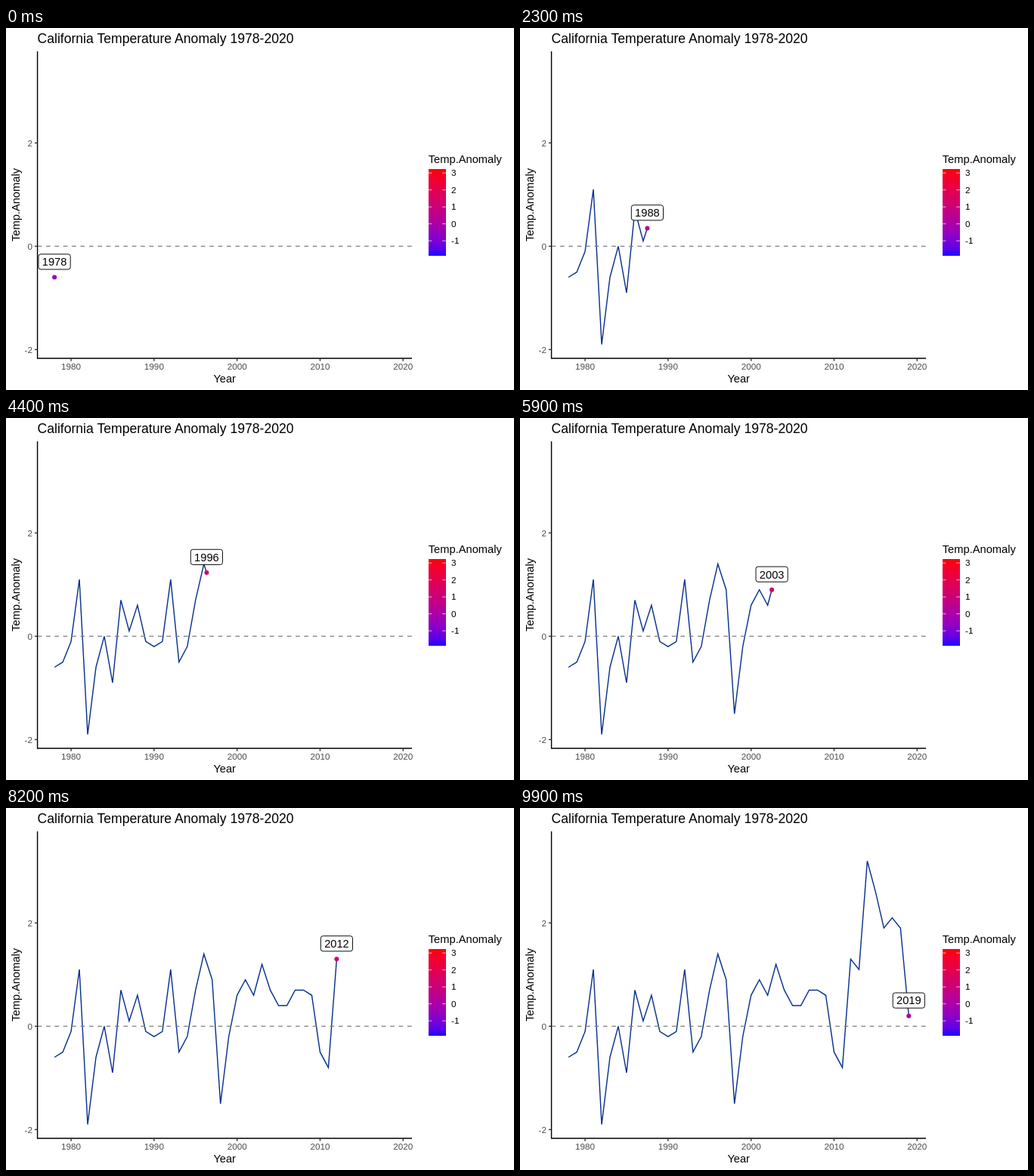
An HTML page that plays this animation: 672x480 px, repeating every 10000 ms.

```html
<!DOCTYPE html>
<html lang="en">
<head>
<meta charset="utf-8">
<title>Temperature anomaly</title>
<style>
html, body { margin: 0; width: 100%; height: 100%; overflow: hidden; background: #fff; }
svg { position: absolute; left: 0; top: 0; font: 14.67px "Liberation Sans", Arial, sans-serif; }
.bar { position: absolute; left: 558.8px; top: 187.3px; width: 23.04px; height: 115.2px;
  background: linear-gradient(in lab, red, blue); }
.small { font-size: 11.73px; }
.axis { fill: #4d4d4d; }
.mid { text-anchor: middle; }
.end { text-anchor: end; }
</style>
</head>
<body>
<div class="bar"></div>
<svg id="chart" width="672" height="480" viewBox="0 0 672 480">
  <text x="41.5" y="20" font-size="17.6">California Temperature Anomaly 1978-2020</text>
  <text x="289.2" y="470" class="mid">Year</text>
  <text transform="translate(18 234.5) rotate(-90)" class="mid">Temp.Anomaly</text>
  <text x="558.8" y="179">Temp.Anomaly</text>
  <path id="line" fill="none" stroke="#08308e" stroke-width="1.42"/>
  <path d="M41.6 289.4H537" stroke="#7f7f7f" stroke-width="1.42" stroke-dasharray="5.69"/>
  <circle id="dot" r="3"/>
  <g id="label">
    <rect x="-21.1" y="-10.1" width="42.2" height="20.2" rx="3" fill="#fff" stroke="#000" stroke-width=".95"/>
    <text y="5.3" class="mid"></text>
  </g>
  <path d="M41.6 31V438H537" fill="none" stroke="#000" stroke-width="1.42"/>
</svg>
<script>
const START = 1978, FRAMES = 100, FRAME_MS = 100;
const values = [
  -.6, -.5, -.1, 1.1, -1.9, -.6, 0, -.9, .7, .1, .6, -.1, -.2, -.1, 1.1, -.5, -.2, .7, 1.4, .9, -1.5,
  -.2, .6, .9, .6, 1.2, .7, .4, .4, .7, .7, .6, -.5, -.8, 1.3, 1.1, 3.2, 2.6, 1.9, 2.1, 1.9, .2
];
const last = values.length - 1;
const $ = id => document.getElementById(id);
const px = year => 86.07 + (year - 1980) * 10.98;
const py = value => 289.4 - value * 68.5;

function add(tag, attrs, text = "") {
  const el = document.createElementNS("http://www.w3.org/2000/svg", tag);
  for (const key in attrs) el.setAttribute(key, attrs[key]);
  el.textContent = text;
  $("chart").append(el);
}
const tick = (d, stroke, width) => add("path", { d, stroke, "stroke-width": width });

for (let year = 1980; year <= 2020; year += 10) {
  tick(`M${px(year)} 438v3.67`, "#333", 1.42);
  add("text", { x: px(year), y: 453, class: "small axis mid" }, year);
}
for (const v of [-2, 0, 2]) {
  tick(`M41.6 ${py(v)}h-3.67`, "#333", 1.42);
  add("text", { x: 35, y: py(v) + 4.2, class: "small axis end" }, v);
}
for (let v = -1; v <= 3; v++) {
  const y = 259.7 - v * 22.5;
  tick(`M558.8 ${y}h4.6m13.8 0h4.6`, "#fff", .7);
  add("text", { x: 589, y: y + 4.2, class: "small" }, v);
}

// Each year lands on a whole frame; positions between are linear.
const frameOf = i => Math.round(i * (FRAMES - 1) / last);

function draw(now) {
  const frame = Math.floor(now / FRAME_MS) % FRAMES;
  let i = 0;
  while (i < last - 1 && frameOf(i + 1) <= frame) i++;
  const part = (frame - frameOf(i)) / (frameOf(i + 1) - frameOf(i));
  const year = START + i + part;
  const value = values[i] + (values[i + 1] - values[i]) * part;
  const x = px(year), y = py(value);

  const points = values.slice(0, i + 1).map((v, k) => [px(START + k), py(v)]);
  $("line").setAttribute("d", "M" + [...points, [x, y]].join("L"));
  $("dot").setAttribute("cx", x);
  $("dot").setAttribute("cy", y);
  $("dot").style.fill = `color-mix(in lab, red ${(value + 1.9) / 5.1 * 100}%, blue)`;
  $("label").setAttribute("transform", `translate(${x} ${py(value + .3)})`);
  $("label").lastElementChild.textContent = Math.round(year);
}

const start = performance.now();
function loop() {
  draw(performance.now() - start);
  requestAnimationFrame(loop);
}
loop();
</script>
</body>
</html>
```
